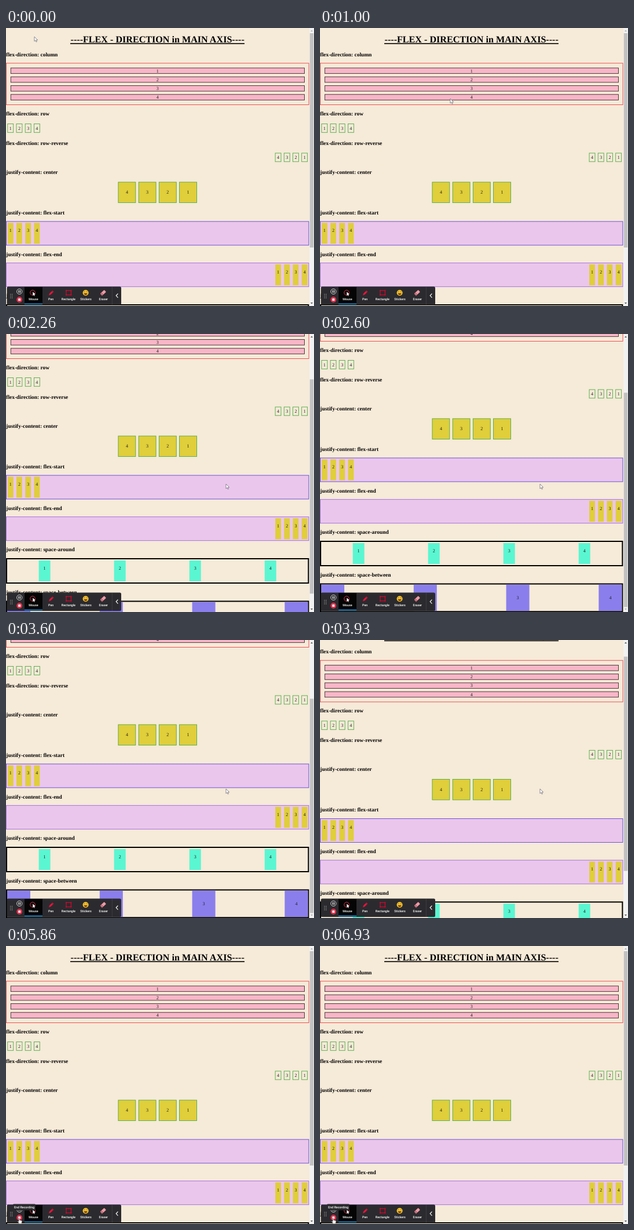
An HTML page for the animation above (7.13 s loop, 532 by 480 pixels).

```html
<!DOCTYPE html>
<html lang="en">
<head>
<meta charset="utf-8">
<title>Flex direction</title>
<style>
  html, body { margin: 0; width: 100%; height: 100%; overflow: hidden; background: #f6ead8; }
  svg { display: block; width: 532px; height: 480px; text-rendering: geometricPrecision; }
  .page { font: 8.06px "Liberation Serif", "Times New Roman", serif; fill: #222; }
  .page .label { font-weight: bold; font-size: 9.44px; fill: #000; }
  .page .title { font-weight: bold; font-size: 16.13px; fill: #000; }
  .ui { font: 500 5.4px Roboto, sans-serif; fill: #fff; }
  .tip { font-size: 4.4px; }
  .mid { text-anchor: middle; }
</style>
</head>
<body>
<svg viewBox="0 0 532 480" xmlns="http://www.w3.org/2000/svg">
  <rect width="532" height="480" fill="#f6ead8"/>
  <g id="page" class="page"></g>

  <g id="scrollbar">
    <rect x="524" width="8" height="480" fill="#f1f1f1"/>
    <rect id="thumb" x="524.8" y="9" width="6.4" height="370" fill="#c1c1c1"/>
    <path id="up" d="M526 6l2-2.4 2 2.4z"/>
    <path id="down" d="M526 474l2 2.4 2-2.4z"/>
  </g>

  <g id="toolbar" class="ui">
    <rect x="1.5" y="446.5" width="197.5" height="31.8" rx="2.5" fill="#2b2b2f"/>
    <path d="M7.8 459.2v7.2M10.6 459.2v7.2" stroke="#aaa" stroke-width="1.2" stroke-dasharray="1.2 1.8"/>
    <circle cx="23.2" cy="455" r="4.6" fill="none" stroke="#ddd" stroke-width=".9"/>
    <path d="M22 452.8v4.4M24.5 452.8v4.4" stroke="#fff" stroke-width="1.1"/>
    <circle cx="23.2" cy="469" r="4.9" fill="#e0304c"/>
    <rect x="21.3" y="467.1" width="3.8" height="3.8" rx=".5" fill="#fff"/>
    <rect x="32" y="447" width="31" height="30.5" fill="#050506"/>
    <rect x="32" y="475.6" width="31" height="1.8" fill="#1688cc"/>
    <circle cx="46" cy="457" r="4.3" fill="none" stroke="#d8344a"/>
    <path d="M46.3 455.5l4.6 4.5-2.1.2 1 2-1 .5-1-2-1.5 1.4z" fill="#fff"/>
    <path d="M74 461.4l.9-3 5.2-5.2 2.2 2.2-5.2 5.1z" fill="#e8143c"/>
    <path d="M79 454.2l2.3 2.2" stroke="#80142a" stroke-width=".7"/>
    <rect x="104" y="453.4" width="8.4" height="7.4" fill="none" stroke="#d4062c" stroke-width="1.2"/>
    <path d="M103 453.4h2m6.4 0h2m-10.4 7.4h2m6.4 0h2" stroke="#d4062c" stroke-width="2"/>
    <circle cx="137.6" cy="457.2" r="5" fill="#f5c32c"/>
    <path d="M134.6 456q1-1.6 2 0M138.7 456q1-1.6 2 0" fill="none" stroke="#5b3d10" stroke-width=".8"/>
    <path d="M134.6 458h6q-.6 3-3 3t-3-3z" fill="#7a3c18"/>
    <g transform="rotate(-42 167.8 457.2)">
      <rect x="163" y="454.8" width="9.6" height="4.8" rx="1" fill="#ef9aa6"/>
      <rect x="163" y="454.8" width="3.4" height="4.8" rx="1" fill="#c96a78"/>
    </g>
    <path d="M183.3 447v31" stroke="#4a4a4e" stroke-width=".7"/>
    <path d="M193.4 458.6l-3.2 3.5 3.2 3.5" fill="none" stroke="#fff" stroke-width="1.2"/>
  </g>

  <g class="ui mid">
    <g id="tipRect" class="tip">
      <rect x="84" y="428.6" width="47.5" height="10.8" rx="1.5" fill="#2a2a2d"/>
      <text x="107.7" y="435.5">Rectangle (Shift+R)</text>
    </g>
    <g id="tipPen" class="tip">
      <rect x="63" y="429.8" width="29.5" height="10" rx="1.5" fill="#2a2a2d"/>
      <text x="77.7" y="436.3">Pen (Shift+P)</text>
    </g>
    <g id="tipEnd">
      <rect x="12" y="445.6" width="39" height="10.6" rx="1.5" fill="#2a2a2d"/>
      <text x="31.5" y="452.8">End Recording</text>
    </g>
  </g>

  <g id="cursor">
    <path id="arrow" d="M0 0v8l1.9-1.7 1.3 2.8 1.2-.6-1.2-2.7h2.5z" fill="#fff" stroke="#5c5e6c" stroke-width=".7"/>
    <path id="hand" d="M0 .8q.8-1.1 1.6 0v3.1l3 .6q1.2.3 1 1.6l-.6 3.6h-4.2l-2.7-3.5q.2-1.3 1.9.2z" fill="#fff" stroke="#333" stroke-width=".5"/>
  </g>
</svg>
<script>
const $ = id => document.getElementById(id);
const LOOP = 7130, STEP = 1000 / 15;
const WIDTH = 523.4, GAP = 5.3, MAX_SCROLL = 120;
const GREEN = '#4aab44', GOLD = '#e0ce3a', LILAC = '#ebc6ec';

const box = (x, y, w, h, fill, stroke = 'none', sw = 0.9) =>
  `<rect x="${x}" y="${y}" width="${w}" height="${h}" fill="${fill}" stroke="${stroke}" stroke-width="${sw}"/>`;
const text = (x, y, s, cls) => `<text x="${x}" y="${y}" class="${cls}">${s}</text>`;

// Where item i of four starts, for each way of justifying
const packed = w => 4 * w + 3 * GAP;
const justify = {
  start: (i, w, pad) => pad + i * (w + GAP),
  end: (i, w, pad) => WIDTH - pad - packed(w) + i * (w + GAP),
  center: (i, w) => (WIDTH - packed(w)) / 2 + i * (w + GAP),
  around: (i, w, pad) => pad + (i + 0.5) * (WIDTH - 2 * pad) / 4 - w / 2,
  between: (i, w, pad) => pad + i * (WIDTH - 2 * pad - w) / 3
};

// A label with its row of four items, framed when frame is given
function section(y, label, place, o) {
  const { w = 9.9, h = 36, pad = 2.8, inset = 2.5, textY = h / 2 + 2.6, order = '1234', fill, stroke, frame, line = 0.9 } = o;
  const top = y + (line > 1 ? 12.8 : 12);
  const rows = [...order].map((n, i) => {
    const x = justify[place](i, w, pad);
    return box(x, top + inset, w, h, fill, stroke) + text(x + w / 2, top + inset + textY, n, 'mid');
  });
  return text(0.3, y, label, 'label') +
    (frame ? box(line / 2, top, WIDTH - line, h + 2 * inset, o.back || 'none', frame, line) : '') +
    rows.join('');
}

const column = [1, 2, 3, 4].map((n, i) =>
  box(8.3, 69 + i * 15.25, 507.2, 9.6, '#f8b6c8', '#3c282e') + text(261.7, 76.5 + i * 15.25, n, 'mid'));

$('page').innerHTML = [
  text(261.7, 25.2, '----FLEX - DIRECTION in MAIN AXIS----', 'title mid'),
  box(111, 26.1, 301, 1.6, '#000'),
  text(0.3, 49, 'flex-direction: column', 'label'),
  box(0.5, 60.8, 522.6, 71.7, 'none', '#ea4048'),
  ...column,
  section(151, 'flex-direction: row', 'start', { h: 14.8, fill: 'none', stroke: GREEN }),
  section(201.5, 'flex-direction: row-reverse', 'end', { h: 14.8, fill: 'none', stroke: GREEN, order: '4321' }),
  section(251.6, 'justify-content: center', 'center', { w: 29.9, h: 35.5, fill: GOLD, stroke: GREEN, order: '4321' }),
  section(322, 'justify-content: flex-start', 'start', { textY: 15.5, fill: GOLD, frame: '#5c44d8', back: LILAC }),
  section(393.7, 'justify-content: flex-end', 'end', { textY: 15.5, fill: GOLD, frame: '#9a68dc', back: LILAC }),
  section(465.2, 'justify-content: space-around', 'around',
    { w: 20, pad: 1.6, inset: 3, textY: 15.5, fill: '#5af6d2', frame: '#000', line: 2 }),
  section(538.7, 'justify-content: space-between', 'between',
    { w: 40, h: 45.4, pad: 2, inset: 1.2, fill: '#8a7eec', frame: '#000', line: 2 })
].join('');

$('toolbar').insertAdjacentHTML('beforeend',
  ['Mouse', 'Pen', 'Rectangle', 'Stickers', 'Eraser']
    .map((s, i) => text(47.5 + i * 30.2, 470.3, s, 'mid')).join(''));

const clamp = v => Math.min(1, Math.max(0, v));
const ease = (t, from, to) => (1 - Math.cos(Math.PI * clamp((t - from) / (to - from)))) / 2;
const fade = (t, from, to = Infinity) => clamp((t - from) / 130) * clamp((to - t) / 130);

const scrollAt = t => MAX_SCROLL * (ease(t, 2000, 2400) - ease(t, 3600, 4080));

// Each move glides from the last resting point to (x, y)
const moves = [
  { from: 0, to: 870, x: 225, y: 122 },
  { from: 1200, to: 1930, x: 380, y: 259 },
  { from: 2600, to: 2930, x: 380, y: 257 },
  { from: 4270, to: 4660, x: 108, y: 453 },
  { from: 4660, to: 4800, x: 64, y: 458 },
  { from: 4800, to: 5060, x: 22, y: 469.5 }
];
function pointerAt(t) {
  let x = 49, y = 15;
  for (const m of moves) {
    const p = ease(t, m.from, m.to);
    x += (m.x - x) * p;
    y += (m.y - y) * p;
  }
  return [x, y];
}

function draw(ms) {
  const t = Math.floor((ms + 6.7) / STEP) * STEP;
  const top = scrollAt(t), [x, y] = pointerAt(t);
  $('page').setAttribute('transform', `translate(0 ${-top})`);
  $('thumb').setAttribute('y', 9 + top * 0.77);
  $('up').setAttribute('fill', top > 0.1 ? '#555' : '#b0b0b0');
  $('down').setAttribute('fill', top < MAX_SCROLL - 0.1 ? '#555' : '#b0b0b0');
  $('cursor').setAttribute('transform', `translate(${x} ${y})`);
  const over = y > 447 && x < 199;
  $('hand').style.display = over ? '' : 'none';
  $('arrow').style.display = over ? 'none' : '';
  $('tipRect').setAttribute('opacity', fade(t, 4530, 4830));
  $('tipPen').setAttribute('opacity', fade(t, 4690, 5000));
  $('tipEnd').setAttribute('opacity', fade(t, 5060));
}

const start = performance.now();
function tick() {
  draw((performance.now() - start) % LOOP);
  requestAnimationFrame(tick);
}
tick();
</script>
</body>
</html>
```
